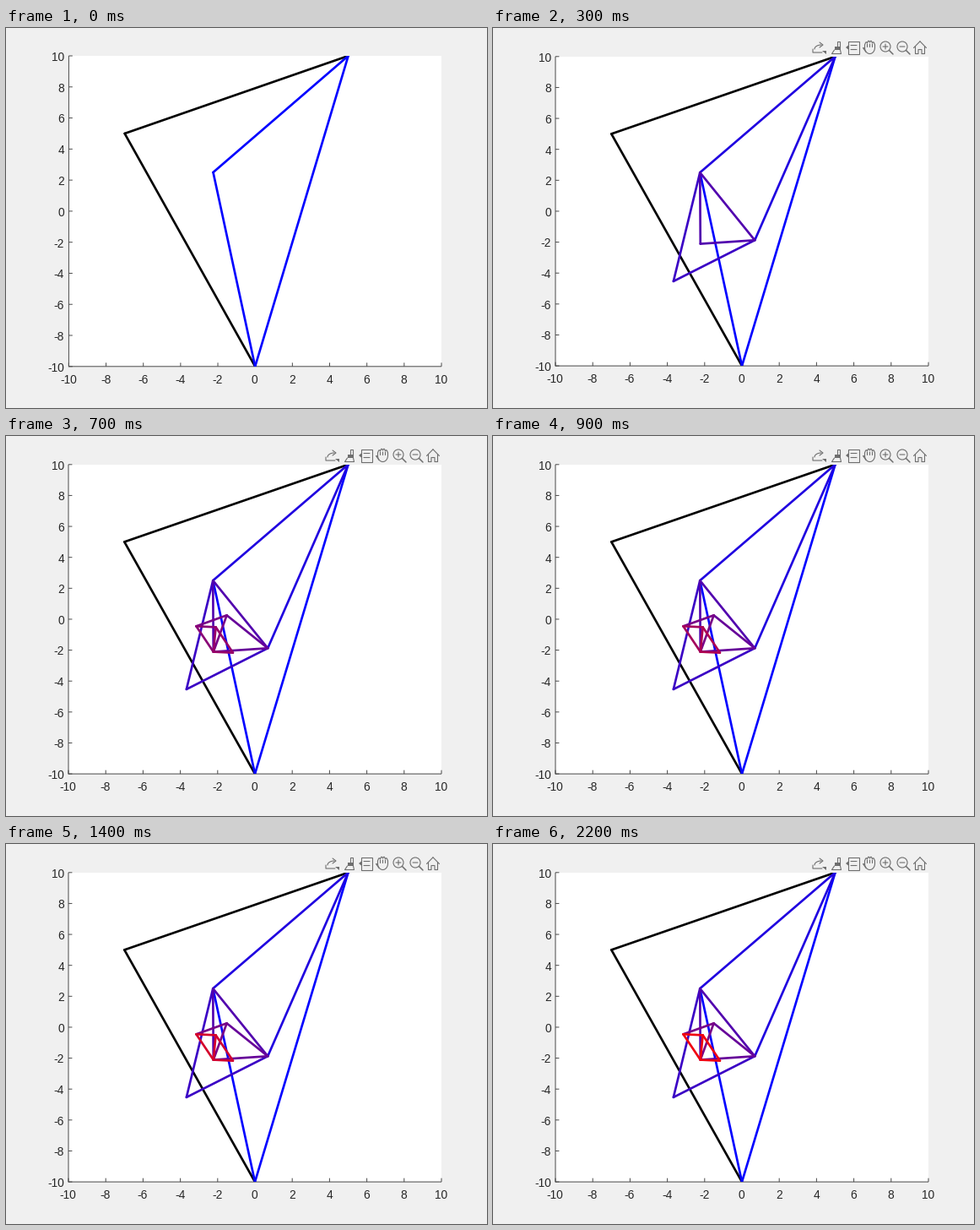
Write a matplotlib script that moves like this. It is 570 px wide and 450 px high and loops after 2.5 s.

```python
from itertools import combinations

import matplotlib.pyplot as plt
import numpy as np
from matplotlib.animation import FuncAnimation
from matplotlib.collections import LineCollection
from matplotlib.patches import Circle, Polygon, Rectangle

W, H, DPI = 570, 450, 100
FRAMES, INTERVAL = 25, 100
PT = 72 / DPI  # points per pixel
INK, ICON = "#262626", "#6e6e6e"
ICON_Y = 23

# plot box in pixels: left, right, top, bottom
FIRST_BOX = (74.4, 516, 33, 400.8)
LATER_BOX = (74, 516, 33.8, 400.1)

START = [(5, 10), (-7, 5), (0, -10)]
CONTRACT, OUTSIDE, REFLECT = 0.5, 1.5, 2.0
OPENING = [(1, CONTRACT), (2, CONTRACT), (0, OUTSIDE), (0, CONTRACT),
           (1, CONTRACT), (2, OUTSIDE), (1, CONTRACT)]

fig = plt.figure(figsize=(W / DPI, H / DPI), dpi=DPI, facecolor="#f0f0f0")
ax = fig.add_axes([0, 0, 1, 1])
ax.set_xlim(0, W)
ax.set_ylim(H, 0)
ax.axis("off")


def simplex_history():
    """Each step moves one vertex through the middle of the other two."""
    tri = np.array(START, float)
    history = []
    for k in range(FRAMES):
        i, reach = OPENING[k] if k < len(OPENING) else (2, REFLECT)
        middle = (tri.sum(axis=0) - tri[i]) / 2
        tri[i] += reach * (middle - tri[i])
        history.append(tri.copy())
    return history


def add_edges(edges, tri, color):
    # a redrawn edge takes the new colour and moves to the top
    for pair in combinations(tri, 2):
        key = frozenset(tuple(np.round(p, 3)) for p in pair)
        edges.pop(key, None)
        edges[key] = color


def trail_color(k):
    blue = 0.88 ** k
    return (1 - blue, 0, blue)


def to_pixels(pts, box):
    left, right, top, bottom = box
    pts = np.array(list(pts), float)
    x = left + (pts[:, 0] + 10) / 20 * (right - left)
    y = bottom - (pts[:, 1] + 10) / 20 * (bottom - top)
    return np.column_stack([x, y])


def stroke(x, y, color=ICON, width=1.1, cap="round"):
    line, = ax.plot(x, y, color=color, lw=width * PT, solid_capstyle=cap,
                    solid_joinstyle="round", zorder=1)
    line.set_snap(False)
    return line


def outline(x, y, w, h):
    return ax.add_patch(Rectangle((x, y), w, h, fill=False, ec=ICON,
                                  lw=1.1 * PT))


def fill(*pts):
    return ax.add_patch(Polygon(pts, fc=ICON, ec="none"))


def label(x, y, value, align):
    return ax.text(x, y, str(value), ha=align, va="baseline", color=INK,
                   family="Liberation Sans", size=13.7 * PT)


def plot_frame(box):
    left, right, top, bottom = box
    parts = [ax.add_patch(Rectangle((left, top), right - left, bottom - top,
                                    fc="white", ec="none", zorder=0))]

    def rule(x, y):
        parts.append(stroke(x, y, "#4a4a4a", 1, "butt"))

    rule([left, left], [top, bottom + 0.5])
    rule([left, right], [bottom, bottom])
    for v in range(-10, 11, 2):
        x, y = to_pixels([(v, v)], box)[0]
        rule([x, x], [bottom, bottom - 4.4])
        rule([left, left + 4.4], [y, y])
        parts.append(label(x - 0.4, bottom + 20.2, v, "center"))
        parts.append(label(69, y + 5.9, v, "right"))
    return parts


def export_icon(x):
    t = np.linspace(0, np.pi / 2, 12)
    return [stroke(x + 3 - 8 * np.cos(t), ICON_Y + 2 - 5 * np.sin(t)),
            stroke([x + 1, x + 5, x + 1], ICON_Y + np.array([-6, -3, 0])),
            stroke([x - 7, x - 7, x + 4], ICON_Y + np.array([2, 6, 6])),
            fill((x + 4, 27), (x + 9, 27), (x + 9, 31))]


def brush_icon(x):
    return [outline(x, ICON_Y - 7.5, 3, 7),
            fill((x - 3, 22), (x + 4, 22), (x + 4, 26), (x - 3, 26)),
            stroke([x - 3, x - 6, x + 5, x + 4],
                   ICON_Y + np.array([3, 7.5, 7.5, 3]))]


def tips_icon(x):
    rows = [stroke([x - 3, x + 4], [y, y]) for y in (20.5, 25.5)]
    return rows + [outline(x - 6.5, ICON_Y - 7.5, 13.5, 15),
                   fill((x - 6, 20.5), (x - 9, 23), (x - 6, 25.5))]


def hand_icon(x):
    t = np.linspace(0, 1, 49)
    tips = ICON_Y - 3 - 3 * np.sin(np.pi * t) - 2 * abs(np.sin(4 * np.pi * t))
    gaps = [stroke([x + d, x + d], [19, 22.5]) for d in (-2.5, 0.5, 3.5)]
    return gaps + [
        stroke(x - 5.5 + 12 * t, tips),
        stroke(x + 0.5 + 6 * np.cos(np.pi * t), 23 + 7.5 * np.sin(np.pi * t)),
        stroke([x + 6.5, x + 6.5], [20, 23]),
        stroke([x - 5.5, x - 5.5, x - 7.5, x - 4], [20, 24, 23.5, 28.5])]


def zoom_icon(x, plus):
    parts = [ax.add_patch(Circle((x - 1, ICON_Y - 1), 6, fill=False,
                                 ec=ICON, lw=1.1 * PT)),
             stroke([x + 3.5, x + 8], [26.5, 31], width=1.5),
             stroke([x - 4, x + 2], [22, 22])]
    if plus:
        parts.append(stroke([x - 1, x - 1], [19, 25]))
    return parts


def home_icon(x):
    half = np.array([7.5, 0])
    parts = []
    for side in (-1, 1):
        parts.append(stroke(x + side * half, [23.5, 15.8]))
        parts.append(stroke(x + side * np.array([5.5, 5.5, 2, 2, 0]),
                            [22, 30.5, 30.5, 25.5, 25.5]))
    return parts


def toolbar():
    return (export_icon(386) + brush_icon(407.5) + tips_icon(427)
            + hand_icon(446) + zoom_icon(466, True) + zoom_icon(486, False)
            + home_icon(506))


history = simplex_history()
first_parts = plot_frame(FIRST_BOX)
later_parts = plot_frame(LATER_BOX) + toolbar()

trail = LineCollection([], linewidths=2.67 * PT, capstyle="round", zorder=3)
ax.add_collection(trail, autolim=False)
clip = Rectangle((0, 0), 1, 1, transform=ax.transData)


def update(k):
    box = LATER_BOX if k else FIRST_BOX
    for part in first_parts:
        part.set_visible(k == 0)
    for part in later_parts:
        part.set_visible(k > 0)

    edges = {}
    add_edges(edges, START, "black")
    for step, tri in enumerate(history[:k + 1]):
        add_edges(edges, tri, trail_color(step))

    left, right, top, bottom = box
    clip.set_bounds(left, top, right - left, bottom - top)
    trail.set_clip_path(clip)
    trail.set_segments([to_pixels(edge, box) for edge in edges])
    trail.set_color(list(edges.values()))
    return [trail]


def reset():
    return update(0)


anim = FuncAnimation(fig, update, frames=FRAMES, init_func=reset,
                     interval=INTERVAL, repeat=True, repeat_delay=0)
plt.show()
```
